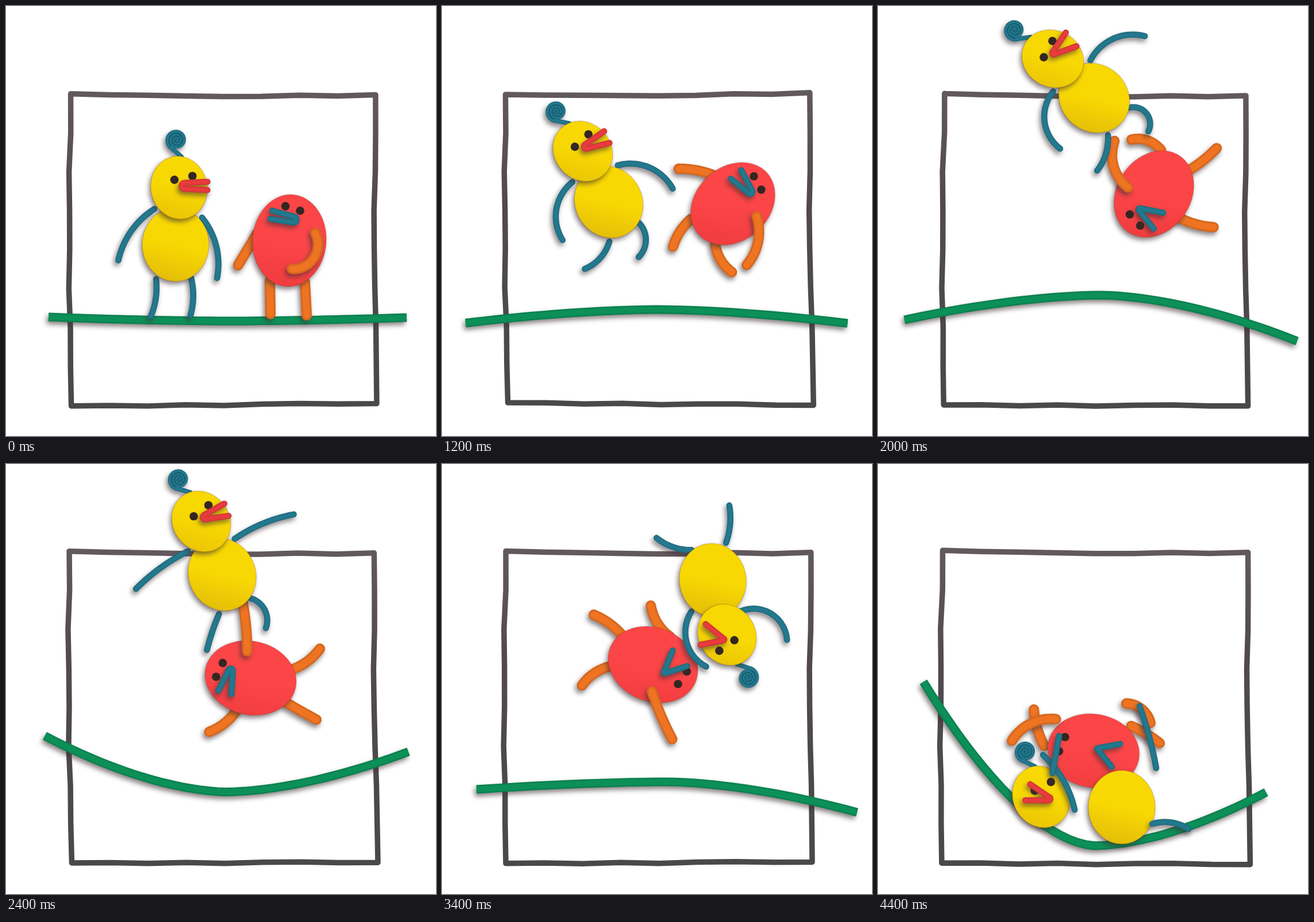
These frames come from a looping animation (748 by 748 pixels, 5.4 s). An HTML page with a canvas:

```html
<!DOCTYPE html>
<html lang="en">
<head>
<meta charset="utf-8">
<title>Clay trampoline</title>
<style>
html, body { margin: 0; width: 100%; height: 100%; overflow: hidden; background: #fff; }
canvas { display: block; width: 100vmin; height: 100vmin; }
</style>
</head>
<body>
<canvas id="stage" width="748" height="748"></canvas>
<script>
const ctx = document.getElementById('stage').getContext('2d');
const STEP = 200, LOOP = 5400, LAST = 22, RAD = Math.PI / 180;
const TEAL = '#23788d', YELLOW = '#f8d803', RED = '#fc4547', ORANGE = '#ee7422',
      LIP = '#e83b3d', GREEN = '#0c9058', INK = '#342622';

// Limbs run left arm, right arm, left leg, right leg; each bends into an arc.
const ARMS = [112, 112, 66, 66], RED_ARMS = [66, 90, 58, 58];

// Frames are [x, y, degrees]. Limbs pair a direction with a turn, both in degrees
// from the body. Beaks are [height, direction, opening]; the rope is
// [left x, left y, middle y, right x, right y].
const rest = {
  neck: [6, -99, -12], beak: [-1, 12, 3], redBeak: [-37, 188, 3],
  shoulders: [[-37, -62], [46, -47], [-34, 60], [27, 58]],
  redShoulders: [[-56, -10], [44, -16], [-29, 72], [32, 70]],
  hop: 0, swing: 0
};
const flight = {
  beak: [-3, 24, 18], redBeak: [-36, 177, 20],
  limbs: [[133, -92], [26, 78], [157, 42], [102, 130]],
  redLimbs: [[162, -25], [40, 72], [107, -15], [-14, -65]]
};
const poses = [];
const pose = (at, changes) => poses.push({ ...rest, ...changes, at });

pose(0, {
  body: [295, 415, 0], red: [493, 408, 4], rope: [74, 541, 548, 697, 542],
  limbs: [[125, -45], [76, 50], [98, 30], [91, 30]],
  redLimbs: [[117, 0], [119, 120], [85, 0], [83, 0]]
});
pose(4, {
  body: [293, 503, -6], red: [477, 475, 4], rope: [34, 474, 618, 701, 480], hop: 138, swing: -40,
  limbs: [[127, -75], [81, 75], [168, 60], [140, 50]],
  redLimbs: [[124, -20], [67, 45], [43, -50], [36, -30]]
});
pose(8, { ...flight, body: [287, 217, -55], red: [535, 251, 92], rope: [48, 629, 438, 710, 624], hop: 24 });
pose(10, { ...flight, body: [376, 160, -50], red: [480, 327, 214], rope: [46, 546, 503, 729, 583], hop: 15 });
pose(14, {
  body: [376, 304, 0], red: [371, 497, 351], rope: [89, 400, 638, 671, 418], hop: 50,
  limbs: [[205, 55], [-21, -30], [110, -60], [73, 60]],
  redLimbs: [[274, 100], [-76, -95], [107, 10], [94, 0]]
});
pose(17, {
  body: [471, 202, 170], red: [367, 349, 472], rope: [60, 566, 553, 722, 606], hop: 70,
  neck: [-8, -98, -25], beak: [-3, 49, 25], redBeak: [-24, 205, 25],
  limbs: [[221, 110], [-95, -95], [105, -30], [29, 40]],
  redLimbs: [[126, 45], [-45, -10], [103, -25], [33, -40]]
});
pose(LAST, {
  body: [424, 597, 360], red: [375, 499, 640], rope: [79, 379, 664, 675, 571], hop: -25, swing: 200,
  neck: [-140, -18, -28], beak: [9, 225, 17], redBeak: [6, 100, 31],
  shoulders: [[-137, -91], [31, -176], [53, 29], [-109, -124]],
  redShoulders: [[-6, -86], [43, -74], [54, 57], [65, 89]],
  limbs: [[60, 35], [75, 10], [8, 50], [100, 0]],
  redLimbs: [[-26, 25], [-126, -65], [111, 15], [-61, -75]]
});

const mix = (a, b, k) => Array.isArray(a) ? a.map((v, i) => mix(v, b[i], k)) : a + (b - a) * k;
const noise = n => { const s = Math.sin(n * 12.9898 + 4) * 43758.5453; return (s - Math.floor(s)) * 2 - 1; };

// Turns a spot inside a frame into a frame on the stage.
function attach([x, y, deg], [u, v, turn = 0]) {
  const c = Math.cos(deg * RAD), s = Math.sin(deg * RAD);
  return [x + u * c - v * s, y + u * s + v * c, deg + turn];
}

function poseAt(step) {
  const i = Math.max(1, poses.findIndex(p => p.at >= step));
  const a = poses[i - 1], b = poses[i], k = (step - a.at) / (b.at - a.at), p = {};
  for (const key in a) p[key] = mix(a[key], b[key], k);
  const lift = b.hop * Math.sin(Math.PI * Math.sqrt(k));
  const sway = b.swing * Math.sin(2 * Math.PI * k) * (1 - k);
  p.body[1] -= lift;
  p.red[1] -= lift;
  p.rope[2] += sway;
  p.rope[1] -= sway * .4;
  p.rope[4] -= sway * .4;
  return p;
}

function shadow(on) {
  ctx.shadowColor = on ? 'rgba(60,45,50,.6)' : 'transparent';
  ctx.shadowBlur = 8;
  ctx.shadowOffsetX = -3;
  ctx.shadowOffsetY = 5;
}

function line(points, color, width, cap = 'round') {
  ctx.beginPath();
  for (const [x, y] of points) ctx.lineTo(x, y);
  ctx.strokeStyle = color;
  ctx.lineWidth = width;
  ctx.lineCap = cap;
  ctx.lineJoin = 'round';
  ctx.stroke();
}

// A rolled strand: shadow, darker rim, lighter core.
function clay(points, color, width, cap) {
  shadow(true);
  line(points, color, width, cap);
  shadow(false);
  line(points, 'rgba(0,0,0,.1)', width, cap);
  line(points, color, width * .65, cap);
}

function limb(frame, shoulder, [dir, turn], length, color, width) {
  const n = 14;
  let at = attach(frame, [...shoulder, dir - turn / 2 + turn / n / 2]);
  const points = [at];
  for (let i = 0; i < n; i++) points.push(at = attach(at, [length / n, 0, turn / n]));
  clay(points, color, width);
}

function blob([x, y, deg], rx, ry, light, dark) {
  const shade = ctx.createLinearGradient(x + 15, y - ry, x - 15, y + ry);
  shade.addColorStop(.5, light);
  shade.addColorStop(1, dark);
  ctx.beginPath();
  ctx.ellipse(x, y, rx, ry, deg * RAD, 0, 7);
  ctx.fillStyle = shade;
  shadow(true);
  ctx.fill();
  shadow(false);
  ctx.strokeStyle = 'rgba(110,50,0,.2)';
  ctx.lineWidth = 1.5;
  ctx.stroke();
}

function eyes(frame, ...spots) {
  ctx.fillStyle = INK;
  for (const spot of spots) {
    const [x, y] = attach(frame, spot);
    ctx.beginPath();
    ctx.arc(x, y, 7.3, 0, 7);
    ctx.fill();
  }
}

// Two lips joined by a rounded fold; they part by the opening angle.
function beak(frame, x, [y, dir, open], color) {
  const fold = attach(frame, [x, y, dir]), gap = 5.6 - open * .16, points = [];
  const u = 40 * Math.cos(open * RAD), v = gap + 40 * Math.sin(open * RAD);
  points.push([u, -v]);
  for (let a = -90; a >= -270; a -= 20) points.push([gap * Math.cos(a * RAD), gap * Math.sin(a * RAD)]);
  points.push([u, v]);
  clay(points.map(p => attach(fold, p)), color, 10.5);
}

function curl(head) {
  const center = attach(head, [13, -82]);
  const spiral = (radius, start) => Array.from({ length: 61 }, (_, i) => {
    const r = radius * (1 - i / 64), a = start + i * .26;
    return attach(center, [r * Math.cos(a), r * Math.sin(a)]);
  });
  clay([attach(head, [15, -52]), ...spiral(16.5, 2.3)], TEAL, 8);
  line(spiral(14, 2.6), 'rgba(10,65,80,.6)', 1.5);
}

function square(step) {
  const ink = ctx.createLinearGradient(0, 150, 0, 700);
  ink.addColorStop(0, '#62595e');
  ink.addColorStop(.35, '#51494e');
  ink.addColorStop(1, '#494949');
  const corners = [[113, 151], [642, 153], [645, 694], [113, 693]]
    .map(([x, y], i) => [x + 3 * noise(step * 9 + i), y + 3 * noise(step * 9 + i + 4)]);
  const outline = [];
  corners.forEach((c, side) => {
    for (let i = 0; i < 8; i++) {
      const [x, y] = mix(c, corners[(side + 1) % 4], i / 8), off = i ? 1.3 * noise(side * 8 + i) : 0;
      const bow = 3 * Math.sin(Math.PI * i / 8);
      outline.push(side % 2 ? [x - bow + off, y] : [x, y + off + (side ? 0 : bow)]);
    }
  });
  line([...outline, corners[0]], ink, 9.5);
}

function rope([lx, ly, mid, rx, ry]) {
  const points = [];
  for (let i = 0; i <= 40; i++) {
    const u = i / 20 - 1;
    points.push([mix(lx, rx, i / 40), mix(mid, u < 0 ? ly : ry, Math.abs(u) ** 1.7)]);
  }
  clay(points, GREEN, 15, 'butt');
}

function draw(step) {
  const p = poseAt(step), head = attach(p.body, p.neck), crashed = step === LAST;
  const arm = i => limb(p.body, p.shoulders[i], p.limbs[i], ARMS[i], TEAL, 10.5);
  const redArm = i => limb(p.red, p.redShoulders[i], p.redLimbs[i], RED_ARMS[i], ORANGE, 18);
  ctx.fillStyle = '#fff';
  ctx.fillRect(0, 0, 748, 748);
  square(step);
  rope(p.rope);

  [0, 2, 3].forEach(redArm);
  blob(p.red, 64, 80, RED, '#f03c3f');
  redArm(1);
  eyes(p.red, [-11, -59], [15, -53]);
  beak(p.red, 5, p.redBeak, TEAL);

  if (!crashed) [0, 1, 2, 3].forEach(arm);
  blob(p.body, 58, 64, YELLOW, '#e3bd08');
  curl(head);
  blob(head, 49, 55, YELLOW, '#e9c406');
  eyes(head, [-5, -15], [27, -15]);
  beak(head, 10, p.beak, LIP);
  if (crashed) [0, 1, 2, 3].forEach(arm);
}

let shown = -1;
function tick(now) {
  const step = Math.min(LAST, Math.floor(now % LOOP / STEP));
  if (step !== shown) draw(shown = step);
  requestAnimationFrame(tick);
}
tick(0);
</script>
</body>
</html>
```
